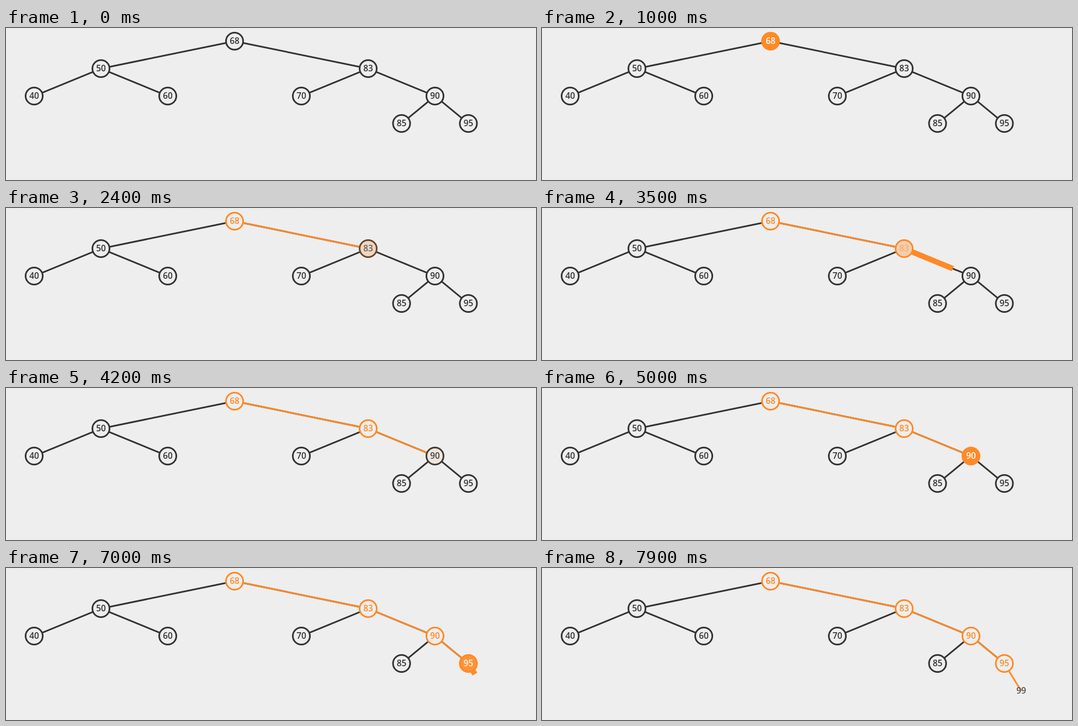
Recreate the animation shown at these times as an HTML page. Size 960 by 277 pixels, loop 8000 ms.

```html
<!DOCTYPE html>
<html lang="en">
<head>
<meta charset="utf-8">
<title>Tree insertion</title>
<style>
  html, body { margin: 0; width: 100%; height: 100%; overflow: hidden; background: #eee; }
  svg { display: block; }
  text { font: 600 15.5px "Open Sans", "Noto Sans", sans-serif; text-anchor: middle; }
</style>
</head>
<body>
<svg id="stage" width="960" height="277" viewBox="0 0 960 277">
  <path d="M0 .5H960" stroke="#e7e7e7" stroke-dasharray="2 2"/>
</svg>
<script>
const LOOP = 8000, TICK = 100, DURATION = 680, RADIUS = 15.5;
const PAPER = [238, 238, 238], INK = [51, 51, 51], ORANGE = [255, 138, 39], WHITE = [255, 255, 255];

const positions = {
  68: [414, 24], 50: [172, 74], 83: [656, 74], 40: [51, 124], 60: [293, 124],
  70: [535, 124], 90: [777, 124], 85: [716.5, 174], 95: [837.5, 174], 99: [868, 224]
};
const pairs = [[68, 50], [68, 83], [50, 40], [50, 60], [83, 70], [83, 90], [90, 85], [90, 95], [95, 99]];

// Each visit lights a node, then walks along the edge to the next one.
const visits = [
  { node: 68, next: 83, light: 500, lead: 180, walk: 1300 },
  { node: 83, next: 90, light: 2400, lead: 265, walk: 3100 },
  { node: 90, next: 95, light: 4200, lead: 180, walk: 5000 },
  { node: 95, next: 99, light: 6000, lead: 185, walk: 6800 }
];
const WALK_TIME = 700, NEW_NODE = 99, REVEAL = 7700;

const stage = document.getElementById("stage");

function add(tag, attributes = {}) {
  const element = document.createElementNS(stage.namespaceURI, tag);
  set(element, attributes);
  return stage.appendChild(element);
}

function set(element, attributes) {
  for (const [name, value] of Object.entries(attributes)) element.setAttribute(name, value);
}

function mix(from, to, p) {
  return `rgb(${from.map((c, i) => Math.round(c + (to[i] - c) * p))})`;
}

function progress(time, start, lead) {
  if (time < start) return 0;
  const t = Math.max(0, Math.min(1, (time - start + lead) / DURATION));
  return t < .5 ? 4 * t ** 3 : 1 - 4 * (1 - t) ** 3;
}

// The part p of the edge between the rims of two nodes.
function edgePath(a, b, p = 1) {
  const [x1, y1] = positions[a], [x2, y2] = positions[b];
  const length = Math.hypot(x2 - x1, y2 - y1);
  const start = 16 / length, end = b === NEW_NODE ? 1 : 1 - start;
  const at = k => `${x1 + (x2 - x1) * k} ${y1 + (y2 - y1) * k}`;
  return `M${at(start)}L${at(start + (end - start) * p)}`;
}

for (const [a, b] of pairs) {
  if (b !== NEW_NODE) add("path", { d: edgePath(a, b), stroke: mix(INK, INK, 0), "stroke-width": 3 });
}
for (const visit of visits) visit.line = add("path", { stroke: mix(ORANGE, ORANGE, 0) });

const nodes = {};
for (const [value, [x, y]] of Object.entries(positions)) {
  const circle = +value === NEW_NODE ? null : add("circle", { cx: x, cy: y, r: RADIUS, "stroke-width": 3 });
  const label = add("text", { x, y: y + 5 });
  label.textContent = value;
  nodes[value] = { circle, label };
  if (circle) paint(value, mix(PAPER, PAPER, 0), mix(INK, INK, 0), mix(INK, INK, 0));
}

function paint(value, fill, stroke, text) {
  set(nodes[value].circle, { fill, stroke });
  set(nodes[value].label, { fill: text });
}

function draw(time) {
  for (const { node, next, light, lead, walk, line } of visits) {
    if (time < walk) {
      const p = progress(time, light, lead);
      paint(node, mix(PAPER, ORANGE, p), mix(INK, ORANGE, p), mix(INK, WHITE, p));
    } else {
      const p = progress(time, walk, -10);
      paint(node, mix(ORANGE, PAPER, p), mix(ORANGE, ORANGE, 0), mix(WHITE, ORANGE, p));
    }
    const done = time >= walk + WALK_TIME;
    set(line, {
      d: edgePath(node, next, done ? 1 : progress(time, walk, 30)),
      "stroke-width": done ? 3 : 10,
      visibility: time < walk ? "hidden" : "visible"
    });
  }
  set(nodes[NEW_NODE].label, {
    fill: mix(PAPER, INK, progress(time, REVEAL, 250)),
    visibility: time < 7500 ? "hidden" : "visible"
  });
}

const begin = performance.now();
function frame() {
  const time = (performance.now() - begin) % LOOP;
  draw(Math.floor(time / TICK) * TICK);
  requestAnimationFrame(frame);
}
frame();
</script>
</body>
</html>
```
